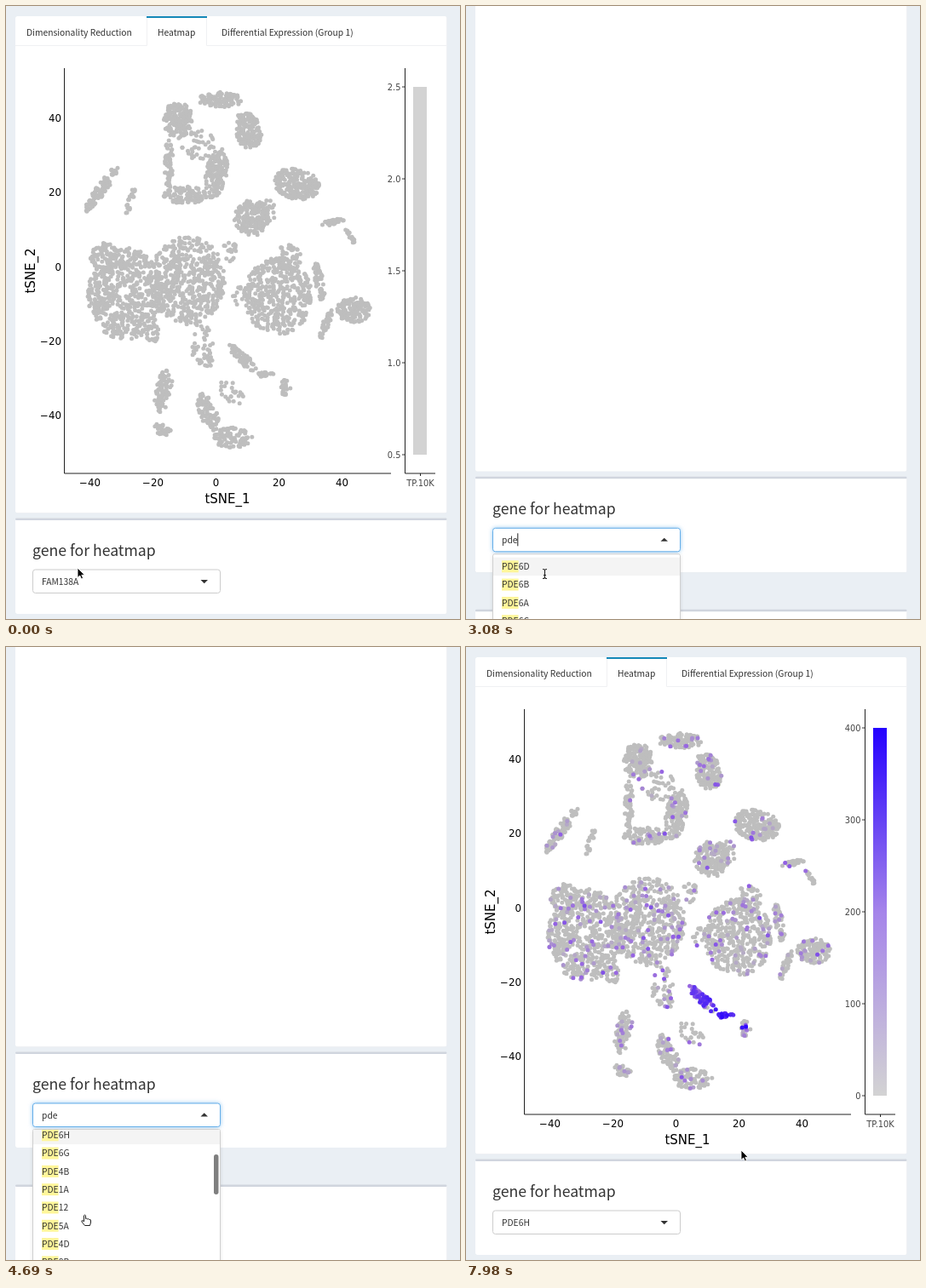
Write an HTML page with a canvas that moves like this. It is 533 px wide and 720 px high and loops after 8 s.

```html
<!DOCTYPE html>
<html lang="en">
<head>
<meta charset="utf-8">
<title>Gene heatmap</title>
<style>
html, body { margin: 0; width: 100%; height: 100%; overflow: hidden; background: #eaeff4; }
#stage { position: relative; width: 533px; height: 720px; overflow: hidden; background: #eaeff4; }
#page, svg, canvas { position: absolute; left: 0; top: 0; }
svg { overflow: visible; }
.ui { font: 10.3px "Noto Sans CJK SC", "Noto Sans CJK JP", sans-serif; fill: #333; }
.ui .head { font-size: 17.65px; }
.axis { font: 11.8px "DejaVu Sans", sans-serif; }
.axis .name { font-size: 15px; }
.axis .key { font-size: 9.84px; fill: #444; }
.panel { fill: #fff; filter: drop-shadow(0 .8px .5px rgba(0, 0, 0, .1)); }
.edge { fill: #d0d5de; }
#field { fill: #fff; stroke: #ccc; }
#field.open { stroke: #66afe9; filter: drop-shadow(0 0 2.5px rgba(102, 175, 233, .7)); }
#sheet { fill: #fff; stroke: #d0d0d0; filter: drop-shadow(0 1px 2px rgba(0, 0, 0, .1)); }
</style>
</head>
<body>
<div id="stage">
  <div id="page">
    <svg width="533" height="960">
      <defs>
        <linearGradient id="scale" x1="0" y1="1" x2="0" y2="0">
          <stop offset="0" stop-color="#d3d3d3"/>
          <stop offset=".5" stop-color="#a584ea"/>
          <stop offset="1" stop-color="#2400ff"/>
        </linearGradient>
        <clipPath id="clip"><rect x="32" y="693" width="219" height="204"/></clipPath>
      </defs>

      <rect class="panel" x="11" y="12" width="506.5" height="583.5" rx="2"/>
      <path d="M11 46.5H165.5V12M235.5 12V46.5H517" fill="none" stroke="#f0f1f3"/>
      <rect x="165" y="12" width="71" height="2" fill="#1488b8"/>
      <g class="ui">
        <text x="24" y="35">Dimensionality Reduction</text>
        <text x="178" y="35">Heatmap</text>
        <text x="253" y="35">Differential Expression (Group 1)</text>
      </g>

      <g id="plot" class="axis"></g>

      <rect class="panel" x="11" y="601.5" width="506.5" height="112.5" rx="2"/>
      <rect class="edge" x="11" y="601.5" width="506.5" height="2.5" rx="1.2"/>
      <rect class="panel" x="11" y="758" width="506.5" height="250" rx="2"/>
      <rect class="edge" x="11" y="757.5" width="506.5" height="2.5" rx="1.2"/>

      <g class="ui">
        <text class="head" x="31" y="646">gene for heatmap</text>
        <rect id="field" x="31.5" y="662" width="220" height="27.5" rx="3"/>
        <text id="value" x="42" y="679.8"></text>
        <rect id="caret" y="668" width="1" height="15" fill="#222"/>
        <path id="arrow" fill="#333"/>
        <g id="menu">
          <rect id="sheet" x="31.5" y="692.5" width="220" height="205" rx="2"/>
          <g clip-path="url(#clip)">
            <g id="list"><rect id="active" x="32" width="219" height="21.5" fill="#f4f4f4"/></g>
            <rect id="thumb" x="244" width="5.5" height="47" rx="2.7" fill="#7f7f7f"/>
          </g>
        </g>
      </g>
    </svg>
    <canvas id="dots" width="533" height="600"></canvas>
  </div>

  <svg width="533" height="720" stroke-linejoin="round">
    <path id="pointer" d="M0 0V11.5L2.7 9L4.5 13L6.5 12.1L4.8 8.3H8.3Z" stroke="#fff" stroke-width=".9"/>
    <path id="beam" d="M-2.5 -5.5Q0 -5.5 0 -4V4Q0 5.5 -2.5 5.5M2.5 -5.5Q0 -5.5 0 -4M0 4Q0 5.5 2.5 5.5M-1.5 1.5H1.5" fill="none" stroke="#222" stroke-width="1.1"/>
    <path id="hand" d="M-1 7V.8Q0 -.6 1 .8V4.5Q2.4 3.6 3.2 5Q4.6 4 5.3 5.6Q7.2 5 7 7V9L6 12.5H0L-3.6 8Q-3.8 6.2 -2.3 6.6L-1 8Z" fill="#fff" stroke="#222"/>
  </svg>
</div>

<script>
const $ = id => document.getElementById(id);
const LOOP = 8000, STEP = 70, ROW = 21.3, BLINK = 515;

function add(parent, tag, attrs, text) {
  const el = document.createElementNS('http://www.w3.org/2000/svg', tag);
  for (const k in attrs) el.setAttribute(k, attrs[k]);
  if (text !== undefined) el.textContent = text;
  parent.append(el);
  return el;
}

function random(seed) {
  return () => {
    seed = (seed + 0x6D2B79F5) | 0;
    let r = Math.imul(seed ^ (seed >>> 15), 1 | seed);
    r = (r + Math.imul(r ^ (r >>> 7), 61 | r)) ^ r;
    return ((r ^ (r >>> 14)) >>> 0) / 4294967296;
  };
}

const clamp = k => Math.min(1, Math.max(0, k));
const ease = (t, a, b) => { const k = clamp((t - a) / (b - a)); return k * k * (3 - 2 * k); };
const show = (el, on) => { el.style.display = on ? '' : 'none'; };

// Axes and colour key
const plot = $('plot');
add(plot, 'path', { d: 'M68.5 73V549H452M468.5 73V549H504M486.5 549V552', fill: 'none', stroke: '#222' });
const keyLabels = [];
for (let i = 0; i < 5; i++) {
  const label = String(40 - 20 * i).replace('-', '\u2212');
  add(plot, 'text', { x: 65, y: 136.3 + 87.1 * i, 'text-anchor': 'end' }, label);
  add(plot, 'text', { x: 394.5 - 74 * i, y: 564, 'text-anchor': 'middle' }, label);
  const y = 95 + 108 * i;
  add(plot, 'path', { d: `M465 ${y}H468`, stroke: '#333' });
  keyLabels.push(add(plot, 'text', { class: 'key', x: 463.5, y: y + 3.5, 'text-anchor': 'end' }));
}
add(plot, 'text', { class: 'name', x: 260, y: 584, 'text-anchor': 'middle' }, 'tSNE_1');
add(plot, 'text', { class: 'name', transform: 'translate(34 311) rotate(-90)', 'text-anchor': 'middle' }, 'tSNE_2');
add(plot, 'text', { class: 'key', x: 486.5, y: 564, 'text-anchor': 'middle' }, 'TP.10K');
const bar = add(plot, 'rect', { x: 478, y: 95, width: 16, height: 432 });

const rnd = random(11), points = [];

// Strong along one strand, sparse elsewhere
function level(x, y) {
  const k = clamp(((x - 266) * 46 + (y - 400) * 34) / (46 ** 2 + 34 ** 2));
  const gap = Math.hypot(x - 266 - 46 * k, y - 400 - 34 * k);
  const heat = Math.exp(-((gap / 13) ** 2));
  if (rnd() < heat) return .35 + .25 * k + .4 * rnd();
  return rnd() < .07 + .2 * Math.exp(-gap / 50) ? .1 + .5 * rnd() ** 2 : 0;
}

// Fills tilted ellipses: x, y, radius x, radius y, tilt
function scatter(density, blobs) {
  for (const [cx, cy, rx, ry, tilt = 0] of blobs) {
    const n = (rx + 1) * (ry + 1) * density, cos = Math.cos(tilt), sin = Math.sin(tilt);
    for (let i = 0; i < n; i++) {
      const a = rnd() * 2 * Math.PI, r = Math.sqrt(rnd());
      const u = Math.cos(a) * r * rx, v = Math.sin(a) * r * ry;
      const x = cx + u * cos - v * sin, y = cy + u * sin + v * cos;
      points.push({ x, y, v: level(x, y) });
    }
  }
}
scatter(.38, [
  [202, 134, 17, 22], [210, 222, 26, 10], [247, 196, 12, 30, .2], [252, 110, 26, 9], [283, 146, 16, 22, -.4],
  [112, 215, 32, 6, -.95], [341, 209, 27, 18, .2], [289, 249, 21, 21], [384, 254, 14, 3, -.2], [405, 272, 12, 2, 1],
  [408, 357, 20, 15], [368, 325, 5, 24, -.2], [376, 373, 4, 19, .35], [278, 414, 22, 6, .8], [305, 433, 11, 3]
]);
scatter(.3, [
  [185, 452, 9, 28, .2], [184, 497, 11, 7, .4], [237, 477, 10, 23, -.4], [266, 507, 23, 12],
  [147, 226, 3, 19, .3], [191, 185, 5, 30], [327, 448, 7, 9]
]);
scatter(.22, [
  [115, 295, 16, 18], [140, 338, 44, 54], [213, 322, 44, 52], [172, 384, 8, 11], [319, 341, 40, 45], [331, 296, 15, 16]
]);
scatter(.1, [
  [226, 163, 20, 17], [264, 288, 9, 17], [230, 399, 14, 30, -.2], [264, 454, 17, 11, .7], [309, 241, 11, 13], [276, 340, 10, 12]
]);

const GREY = [190, 190, 190], VIOLET = [150, 100, 226], BLUE = [36, 0, 255];
const mix = (a, b, k) => a.map((c, i) => Math.round(c + (b[i] - c) * k));
const shade = v => `rgb(${v < .5 ? mix(GREY, VIOLET, v * 2) : mix(VIOLET, BLUE, v * 2 - 1)})`;

points.sort((p, q) => p.v - q.v);
const ctx = $('dots').getContext('2d');
let drawn = null;
function drawPlot(hot) {
  if (hot === drawn) return;
  drawn = hot;
  ctx.clearRect(0, 0, 533, 600);
  for (const p of points) {
    ctx.fillStyle = shade(hot ? p.v : 0);
    ctx.beginPath();
    ctx.arc(p.x, p.y, 2.5, 0, 7);
    ctx.fill();
  }
  bar.setAttribute('fill', hot ? 'url(#scale)' : '#d3d3d3');
  keyLabels.forEach((el, i) => { el.textContent = hot ? 400 - 100 * i : (2.5 - .5 * i).toFixed(1); });
}

// Menu rows
const list = $('list');
const rows = '6D 6B 6A 6C 6H 6G 4B 1A 12 5A 4D 8B 3A 7A 10A 11A 8A 2A 3B 4A'.split(' ').map((id, i) => {
  const y = 707 + ROW * i;
  const mark = add(list, 'rect', { x: 42, y: y - 7, width: 19.6, height: 14, fill: '#fff69a' });
  const text = add(list, 'text', { x: 42, y: y + 3.8 }, 'PDE' + id);
  return { mark, text };
});

const OPEN = 140, CLEAR = 630, PICK = 5950, KEYS = [1400, 1610, 1750];
const typedAt = t => KEYS.filter(k => k <= t).length;

// Start, end, dx, dy
const moves = [[0, 280, 4, 15], [2170, 2520, 4.5, -8], [5250, 5670, 0, -5], [5880, 6090, 1.5, -16], [6300, 7000, 229, -55]];

function moveCursor(t) {
  let x = 84, y = 660;
  for (const [a, b, dx, dy] of moves) {
    const k = ease(t, a, b);
    x += dx * k;
    y += dy * k;
  }
  const kind = t < OPEN || t >= PICK ? 'pointer' : t < 3640 ? 'beam' : 'hand';
  for (const id of ['pointer', 'beam', 'hand']) show($(id), id === kind);
  $(kind).setAttribute('transform', `translate(${x} ${y})`);
}

function render(time) {
  const t = Math.floor(time / STEP) * STEP;
  const open = t >= OPEN && t < PICK;
  const typed = typedAt(t), found = typedAt(t - STEP);

  const scroll = t < 7840 ? 126 * ease(t, 2775, 3495) : 0;
  $('page').style.transform = `translateY(${-scroll}px)`;

  const loaded = t >= 7910;
  const alpha = loaded ? 1 : t >= 980 ? 0 : 1 - .7 * clamp((t - CLEAR) / 280);
  plot.style.opacity = $('dots').style.opacity = alpha;
  drawPlot(loaded);

  $('field').classList.toggle('open', open);
  $('value').textContent = t < CLEAR ? 'FAM138A' : t >= PICK ? 'PDE6H' : 'pde'.slice(0, typed);
  $('arrow').setAttribute('d', open ? 'M228.5 677.5H237L232.75 673.3Z' : 'M228.5 674H237L232.75 678.2Z');

  const lastKey = [OPEN, CLEAR, ...KEYS].filter(k => k <= t).pop();
  show($('caret'), open && (t - lastKey) % (2 * BLINK) < BLINK);
  $('caret').setAttribute('x', t < CLEAR ? 87 : 42 + 6.1 * typed);

  show($('menu'), open);
  const offset = 210 * (ease(t, 3745, 4200) - ease(t, 4445, 4900));
  list.setAttribute('transform', `translate(0 ${-offset})`);
  $('active').setAttribute('y', 696.3 + (t >= 3640 ? 4 * ROW : 0));
  rows[0].text.textContent = found ? 'PDE6D' : 'FAM138A';
  rows[0].mark.setAttribute('width', 6.55 * found);
  $('thumb').setAttribute('y', 695 + offset * .29);
  $('thumb').style.opacity = t < 3780 ? 0 : 1 - clamp((t - 5250) / 350);

  moveCursor(t);
}

const start = performance.now();
function tick() {
  render((performance.now() - start) % LOOP);
  requestAnimationFrame(tick);
}
tick();
</script>
</body>
</html>
```
